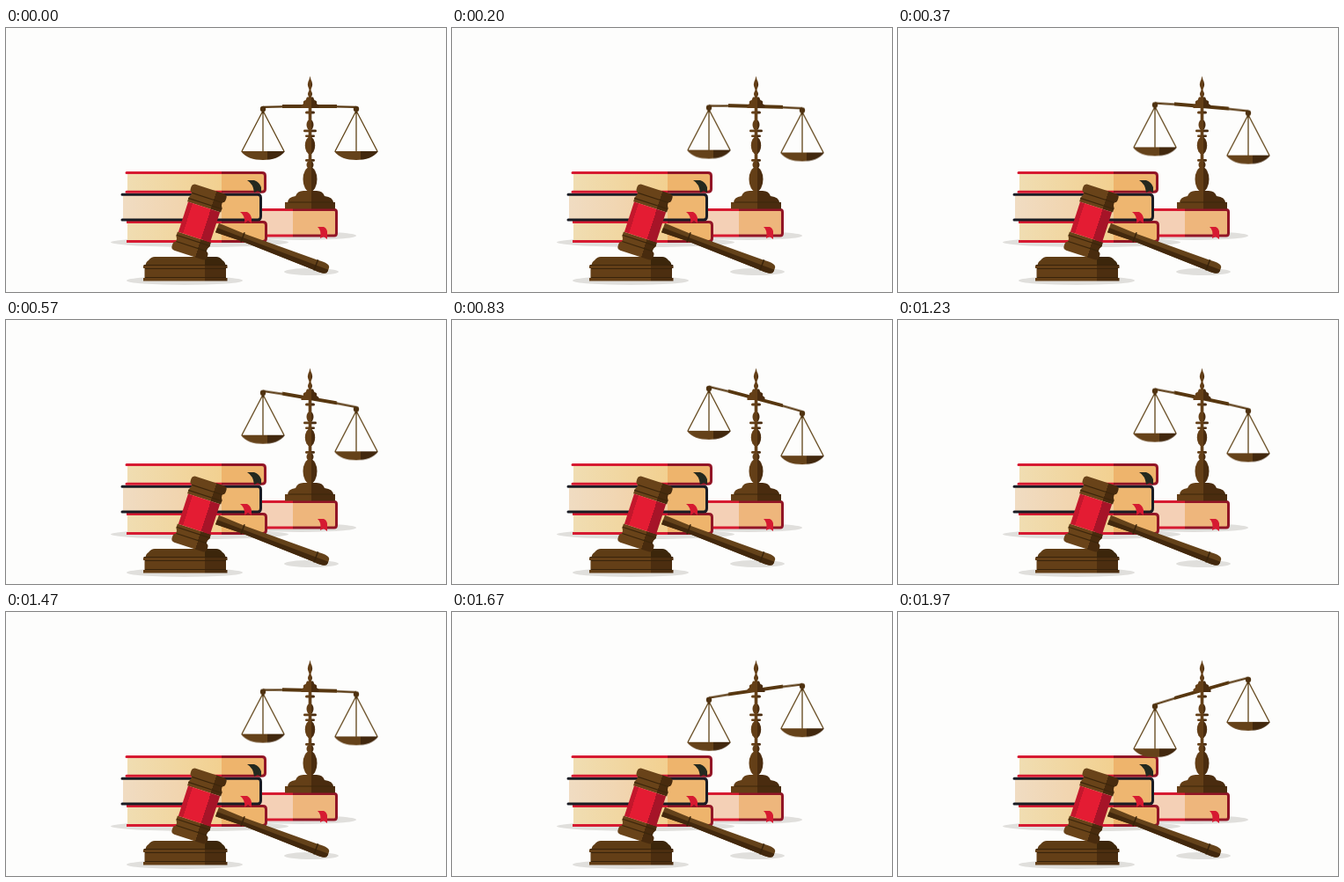
Animation, 500 px wide and 300 px high, one loop 2 s. Source, as an HTML page without scripts:

```html
<!DOCTYPE html>
<html lang="en">
<head>
<meta charset="utf-8">
<title>Scales and gavel</title>
<style>
html, body { margin: 0; width: 100%; height: 100%; overflow: hidden; background: #fdfdfc; }
svg { display: block; width: 500px; height: 300px; }
.beam, .pan { animation: 2s cubic-bezier(.364, 0, .636, 1) infinite; }
.beam { animation-name: tilt; transform-origin: 345px 90px; }
.pan { animation-name: sway; }
.left { --rise: -15.2px; --drop: 15.2px; }
.right { --rise: 15.2px; --drop: -15.2px; }
@keyframes tilt {
  0% { transform: skewY(0deg); }
  50% { transform: skewY(16deg); }
  100% { transform: skewY(-16deg); }
}
@keyframes sway {
  0% { transform: translateY(0); }
  50% { transform: translateY(var(--rise)); }
  100% { transform: translateY(var(--drop)); }
}
</style>
</head>
<body>
<svg viewBox="0 0 500 300">
  <defs>
    <linearGradient id="brass" gradientUnits="userSpaceOnUse" x1="245" x2="445">
      <stop offset=".51" stop-color="#643f17"/><stop offset=".51" stop-color="#4a2c0f"/>
    </linearGradient>
    <linearGradient id="bowl">
      <stop offset=".6" stop-color="#65421a"/><stop offset=".6" stop-color="#42280e"/>
    </linearGradient>
    <linearGradient id="red" gradientUnits="userSpaceOnUse" x1="145" x2="345">
      <stop offset=".5" stop-color="#d61a31"/><stop offset=".5" stop-color="#921526"/>
    </linearGradient>
    <linearGradient id="sideRed" gradientUnits="userSpaceOnUse" x1="226" x2="426">
      <stop offset=".5" stop-color="#d61a31"/><stop offset=".5" stop-color="#921526"/>
    </linearGradient>
    <linearGradient id="gold"><stop stop-color="#f0ddb2"/><stop offset="1" stop-color="#f2d090"/></linearGradient>
    <linearGradient id="peach"><stop stop-color="#f0dcc2"/><stop offset="1" stop-color="#f2cfa0"/></linearGradient>
    <linearGradient id="wood" gradientUnits="userSpaceOnUse" x1="-20" x2="20">
      <stop offset=".7" stop-color="#694319"/><stop offset=".7" stop-color="#482b0e"/>
    </linearGradient>
    <linearGradient id="band" gradientUnits="userSpaceOnUse" x1="-20" x2="20">
      <stop offset=".16" stop-color="#c3172c"/><stop offset=".16" stop-color="#e41c33"/>
      <stop offset=".7" stop-color="#e41c33"/><stop offset=".7" stop-color="#a61428"/>
    </linearGradient>
    <linearGradient id="slab" gradientUnits="userSpaceOnUse" x1="156" x2="252">
      <stop offset=".73" stop-color="#5e3c15"/><stop offset=".73" stop-color="#3c260b"/>
    </linearGradient>
    <linearGradient id="plinth" gradientUnits="userSpaceOnUse" x1="156" x2="252">
      <stop offset=".73" stop-color="#643f17"/><stop offset=".73" stop-color="#4c2e10"/>
    </linearGradient>
    <g id="pan">
      <path d="M0 94L-24 140M0 94V140M0 94L24 140" fill="none" stroke="#604418" stroke-width="1.3"/>
      <path d="M-25 140H25C20 147 11 150 0 150S-20 147-25 140Z" fill="url(#bowl)"/>
      <circle cy="92" r="3.2" fill="#4f3210"/>
      <circle cy="96" r="1.3" fill="#4f3210"/>
    </g>
    <path id="cap" fill="url(#wood)" d="M-17-39.500H17Q21-39 21-35.500V-33Q21-30 18-29Q18-25 20-23V-18H-20V-23Q-18-25-18-29Q-21-30-21-33V-35.500Q-21-39-17-39.500Z"/>
  </defs>

  <g fill="#e0dfdc">
    <ellipse cx="220" cy="243.500" rx="101" ry="5.500"/>
    <ellipse cx="336" cy="236" rx="62" ry="5"/>
    <ellipse cx="347" cy="277" rx="31" ry="4"/>
    <ellipse cx="203" cy="287" rx="66" ry="5"/>
  </g>

  <!-- books -->
  <path fill="#f4d0b6" d="M290 207H327V235H290Z"/>
  <path fill="#eeb67c" d="M326 207H374V235H326Z"/>
  <path d="M290 206.500H373Q375.500 206.500 375.500 209V233Q375.500 236 373 236H290" fill="none" stroke="url(#sideRed)" stroke-width="3"/>
  <path fill="#d61a31" d="M354 226H361Q364 227 365 231V240L361 237L357 239Q359 230 354 226Z"/>

  <path fill="url(#gold)" d="M138 221H246V242H138Z"/>
  <path fill="#eeb46c" d="M245 221H294V242H245Z"/>
  <path d="M137 220.500H292Q295.500 220.500 295.500 224V239Q295.500 242.500 292 242.500H137" fill="none" stroke="url(#red)" stroke-width="3"/>

  <path fill="url(#peach)" d="M133 190H246V217H133Z"/>
  <path fill="#eeb670" d="M245 190H288V217H245Z"/>
  <path d="M132 189.300H286Q289.500 189.300 289.500 193V214Q289.500 218 286 218H132" fill="none" stroke="#1a1c24" stroke-width="3" stroke-linecap="round"/>
  <path fill="#d61a31" d="M266 209H274Q278 211 279 216V222L275 219L271 222Q272 213 266 209Z"/>

  <path fill="url(#gold)" d="M138 165H246V186H138Z"/>
  <path fill="#eeb46c" d="M245 165H293V186H245Z"/>
  <path d="M137 164.500H291Q294.500 164.500 294.500 168V183Q294.500 186.300 291 186.300H137" fill="none" stroke="url(#red)" stroke-width="3" stroke-linecap="round"/>
  <path fill="#24291f" d="M274 173H282Q288 175 290 181V187L286 185L282 187Q281 177 274 173Z"/>

  <!-- scales -->
  <g class="beam" fill="#573710">
    <path d="M292 88.700L314 88.300V87H376V88.300L398 88.700V91L376 90.500V91H314V90.500L292 91Z"/>
  </g>
  <g fill="url(#brass)">
    <path d="M345.500 54.500L346.500 58.500Q349.500 64 347 68.500Q346 70 347 72Q349 75 347 78V81H344V78Q342 75 344 72Q345 70 344 68.500Q341.500 64 344.500 58.500Z"/>
    <path d="M335.500 91V88L338 86Q337 82.500 340.500 82L342 78.500H349L350.500 82Q354 82.500 353 86L355.500 88V91Z"/>
    <path d="M343.700 90H347.300V186H343.700Z"/>
    <rect x="340" y="94.500" width="11" height="3" rx="1.500"/>
    <ellipse cx="345.500" cy="110" rx="4" ry="6"/>
    <rect x="338" y="115.500" width="15" height="2.800" rx="1.400"/>
    <rect x="340" y="121.500" width="11" height="2.600" rx="1.300"/>
    <ellipse cx="345.500" cy="133.500" rx="5.700" ry="10"/>
    <rect x="340" y="149" width="11" height="2.800" rx="1.400"/>
    <ellipse cx="345.500" cy="155.500" rx="4" ry="4.500"/>
    <ellipse cx="345.500" cy="172" rx="8" ry="14"/>
    <path d="M320 199Q320 192 329 191Q331 185 338 185H353Q360 185 362 191Q372 192 372 199Z"/>
    <path d="M317 198H374V205.500H317Z"/>
  </g>
  <path d="M321 198H372" stroke="#3c260b"/>
  <g class="pan left"><use href="#pan" x="292"/></g>
  <g class="pan right"><use href="#pan" x="398"/></g>

  <!-- sounding block -->
  <path fill="url(#slab)" d="M158.500 269.500Q159 265.500 162 264Q165 260 169 260H239Q243 260 246 264Q249 265.500 249.500 269.500Z"/>
  <path fill="url(#plinth)" d="M156 269.500H251.500V273H250V284H251.500V287.500H156V284H157.500V273H156Z"/>
  <path d="M157 269.500H251M158 273.500H250M158 283.500H250" stroke="#38230b"/>

  <!-- gavel -->
  <g transform="translate(240 227) rotate(20.700)">
    <path fill="#64421a" d="M0-5.500L32-4.500L120-6Q135-7.500 135-2V2Q135 7.500 120 6L32 4.500L0 5.500Z"/>
    <path fill="#42280d" d="M0 0H135V2Q135 7.500 120 6L32 4.500L0 5.500Z"/>
    <path d="M31-6V6M120-6.500V6.500" stroke="#38230b" stroke-width="1.500"/>
  </g>
  <g transform="translate(219.500 220.500) rotate(18)">
    <use href="#cap"/>
    <use href="#cap" transform="scale(1 -1)"/>
    <path fill="url(#band)" d="M-19-18H19V18H-19Z"/>
    <path d="M-18-29H18M-20-22H20M-20 22H20M-18 29H18" stroke="#3c260b" stroke-width="1.200"/>
  </g>
</svg>
</body>
</html>
```
